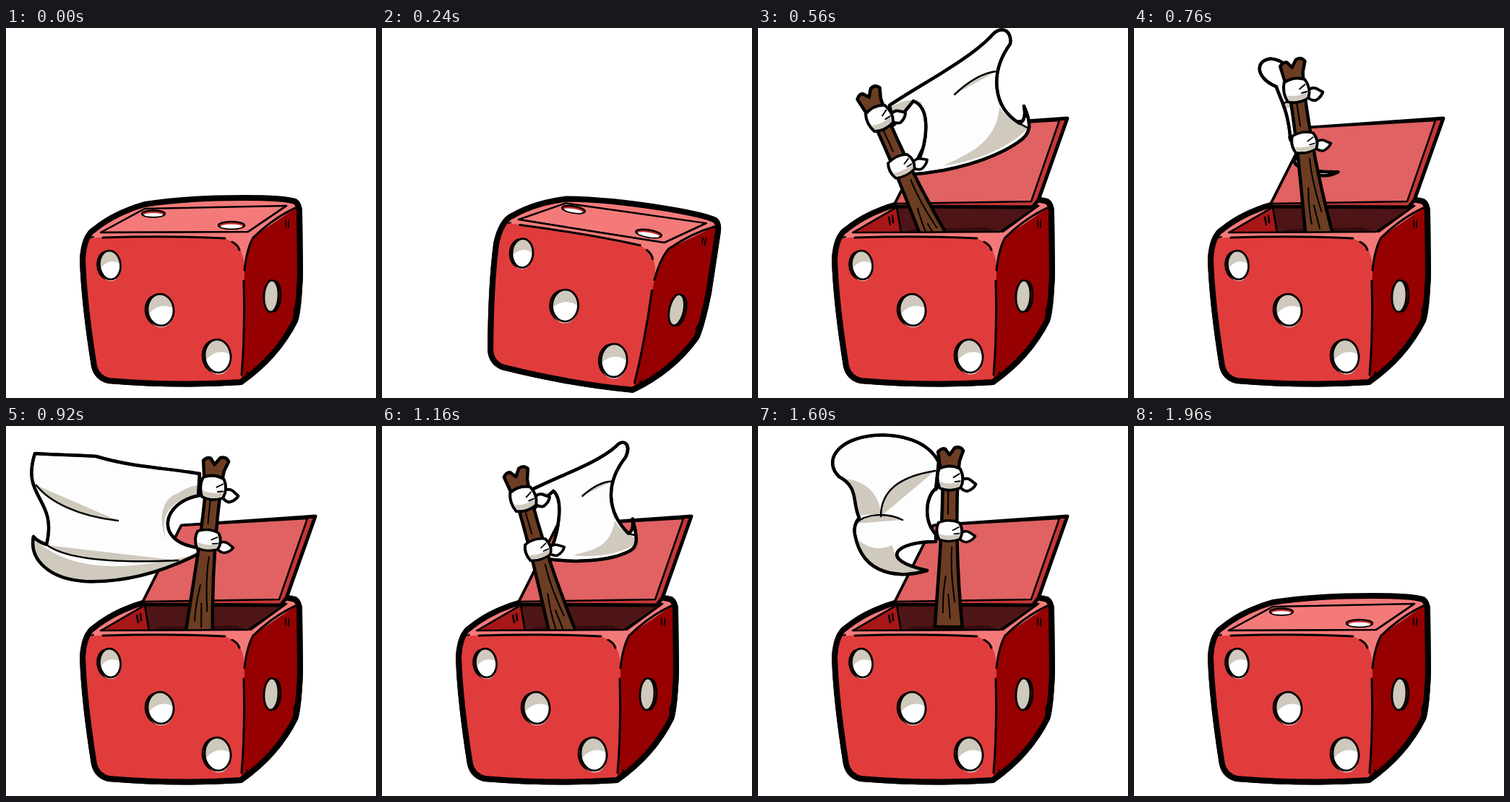
Recreate the animation shown at these times as an HTML page. Size 512 by 512 pixels, loop 2 s.

```html
<!DOCTYPE html>
<html lang="en">
<head>
<meta charset="utf-8">
<title>Dice box with flag</title>
<style>
html, body { margin: 0; width: 100%; height: 100%; overflow: hidden; background: #fff; }
svg { display: block; width: 100%; height: 100%; }
.ink { stroke: #000; stroke-linecap: round; stroke-linejoin: round; }
.line { fill: none; }
.cloth { fill: #fdfdfd; stroke-width: 4; }
.shade { fill: #cfc9be; }
</style>
</head>
<body>
<svg viewBox="0 0 512 512">
  <defs><clipPath id="flagClip"><path id="flagClipPath"/></clipPath></defs>
  <g id="die">
    <path id="body" class="ink" fill="#f47a7a" stroke-width="8"/>
    <g id="panel" class="ink" stroke-width="2.5">
      <path class="line" d="M131 283L192 250L388 246L335 282Z"/>
      <g id="topPips"></g>
    </g>
    <g id="inside" class="ink" stroke-width="2.5">
      <path fill="#4d1515" d="M130 284L192 248L388 246L336 284Z"/>
      <path fill="#a81717" d="M130 284L192 248L198 284Z"/>
      <path fill="#350b0e" stroke="none" d="M199 283L216 278L318 276L336 283Z"/>
      <path class="line" d="M181 262l2 10M186 260l1 9"/>
      <path id="lidEdge" fill="#c53636" stroke-width="5"/>
      <path id="lid"/>
    </g>
    <g id="banner">
      <path id="flag" class="ink cloth" stroke-width="4.5"/>
      <g clip-path="url(#flagClip)">
        <path id="shades" class="shade"/>
        <path id="folds" class="ink shade" stroke-width="2.5"/>
      </g>
      <path id="flagLine" class="ink line" stroke-width="4.5"/>
      <g id="pole">
        <path class="ink" fill="#6c3d22" stroke-width="4.5" d="M-14 -262L-17 -282Q-12 -288 -7 -286L-1 -278L6 -288Q14 -291 18 -284L13 -270L11 -250C9 -180 12 -110 20 -40L-18 -40C-14 -110 -9 -180 -10 -250Z"/>
        <path class="ink line" stroke-width="2" d="M-2 -228V-196M4 -150Q2 -120 9 -75M-4 -110Q-8 -85 -7 -60M0 -85L3 -52"/>
        <g id="knots"></g>
      </g>
    </g>
    <path fill="#f47a7a" d="M122 283L336 282L347 288L330 306L108 298Z"/>
    <path class="ink line" stroke-width="2.5" d="M131 283L335 282L388 246"/>
    <path fill="#e03c3c" d="M108 300Q112 290 125 290Q230 286 300 291Q328 296 330 330L327 490Q240 496 142 488Q126 484 122 468Q108 380 106 320Z"/>
    <path fill="#960000" d="M330 335Q334 297 345 287L402 248L407 340Q405 390 400 405Q375 455 326 490Z"/>
    <path class="ink line" stroke-width="3" d="M134 290Q230 287 303 291M313 296Q321 300 323 307M329 350Q331 420 326 480M330 335Q333 306 342 290Q370 263 400 249"/>
    <path class="ink line" stroke-width="2" d="M387 266V275M391 267V276M402 380L398 393M334 476L332 482M113 291L121 289"/>
    <g id="pips"></g>
    <path id="edge" class="ink line" stroke-width="8"/>
  </g>
</svg>
<script>
const $ = id => document.getElementById(id);
const set = (id, attrs) => Object.entries(attrs).forEach(([k, v]) => $(id).setAttribute(k, v));
const LOOP = 2000, STEP = 40, PIVOT = [262, 330];

const edge = "M122 279Q108 288 106 320Q108 380 122 468Q126 484 142 488Q240 496 325 490" +
  "Q375 455 400 405Q405 390 407 340L406 256Q406 244 400 240";
set("edge", { d: edge });
set("body", { d: edge + "Q385 235 330 235Q250 235 192 244Q150 256 122 279Z" });

function pip(x, y, rx, ry, side) {
  const white = side ? "" :
    `<path fill="#fff" d="M${-rx} ${ry * .2}Q0 ${-ry * .55} ${rx} 0A${rx} ${ry} 0 0 1 ${-rx} ${ry * .2}"/>`;
  const dx = side ? 4 : -4;
  return `<g transform="translate(${x} ${y}) rotate(${side ? 3 : -6})">
    <ellipse class="ink" cx="${dx}" rx="${rx - 1}" ry="${ry - 1}" fill="#a51616" stroke-width="2.5"/>
    <ellipse rx="${rx}" ry="${ry}" fill="#cfc9be"/>${white}
    <ellipse class="ink line" rx="${rx}" ry="${ry}" stroke-width="2.8"/></g>`;
}
$("pips").innerHTML = pip(144, 328, 14.5, 20) + pip(214, 390, 18, 22) +
  pip(293, 454, 18, 23) + pip(367, 371, 10, 22, true);
$("topPips").innerHTML = [[204, 257, 16, 4.5], [312, 273, 18, 5]].map(([x, y, rx, ry]) =>
  `<ellipse cx="${x}" cy="${y}" rx="${rx}" ry="${ry}" fill="#c52d2d"/>
   <ellipse cx="${x}" cy="${y + 1.5}" rx="${rx - 3}" ry="${ry - 2}" fill="#fff" stroke="none"/>`).join("");
$("knots").innerHTML = [[-246, 1], [-173, .86]].map(([y, s]) =>
  `<g class="ink" transform="translate(0 ${y}) scale(1 ${s})">
    <path class="cloth" d="M14 4Q22 -2 28 2L36 8Q33 15 24 18Q16 17 12 8Z"/>
    <path class="cloth" d="M-15 -13Q0 -20 14 -13Q21 0 15 13Q0 20 -14 14Q-20 0 -15 -13Z"/>
    <path class="shade" stroke="none" d="M-14 5Q-2 10 14 5L13 12Q0 17 -12 12Z"/>
    <path class="line" stroke-width="2" d="M13 -6L5 -1M14 4L7 5"/></g>`).join("");

// Cloth poses: outline, two shaded patches, two fold lines
const poses = {
  right: { angle: -24.6, rise: -20,
    flag: "182 107 230 75 290 45 322 12 335 -5 352 2 349 22 320 62 325 110 362 132 370 128 370 118 368 108 380 135 377 147 360 158 325 182 265 200 206 203 222 183 234 160 240 110 215 101 188 134",
    shades: ["333 60 322 110 340 125 374 138 350 165 300 185 258 190 310 165 345 150 333 60",
      "188 134 195 115 205 108 228 104 215 96 200 100 183 110 183 118 185 126 188 134"],
    folds: ["362 132 365 134 369 136 373 138", "330 60 310 62 290 75 272 92"] },
  curl: { angle: -26.3, rise: -20,
    flag: "188 110 200 95 225 75 250 48 270 25 305 22 336 12 310 55 345 40 352 108 355 105 360 98 362 91 378 130 370 140 360 148 320 170 265 195 210 204 222 183 232 160 236 115 214 105 190 133",
    shades: ["215 92 260 88 300 85 330 55 315 45 330 25 336 12 315 55 270 60 215 92",
      "188 134 195 118 205 106 232 130 225 115 215 105 200 106 195 108 190 112 188 118"],
    folds: ["352 108 340 130 300 165 222 184", "205 97 240 85 300 92 338 58"] },
  billow: { angle: .8, rise: 12,
    flag: "250 50 235 20 195 10 160 13 110 18 90 48 112 70 140 85 130 105 140 127 135 133 132 140 134 150 145 210 200 210 234 200 165 185 190 160 246 160 246 150 228 130 232 95 248 85 246 88",
    shades: ["134 150 135 190 150 210 232 200 185 195 190 170 185 165 165 175 140 165 134 150",
      "112 72 122 80 135 90 135 125 150 122 165 122 172 124 165 90 150 75 112 72"],
    folds: ["135 135 150 120 180 120 200 130", "170 125 170 90 195 70 245 62"] },
  left: { angle: 5.7, rise: 0,
    flag: "268 66 220 58 170 56 125 42 100 40 70 40 40 38 20 100 72 100 56 164 50 162 42 158 38 153 32 185 60 212 110 215 170 217 225 198 268 176 264 168 205 160 215 105 268 96 266 96",
    shades: ["38 155 40 190 60 213 110 215 160 217 215 203 262 178 170 200 90 205 38 155",
      "268 96 225 102 212 125 222 158 210 130 215 100 238 93 250 85 260 82 268 82"],
    folds: ["57 165 85 185 150 190 238 186", "42 82 60 105 100 125 155 131"] }
};

function rotate([x, y], degrees) {
  const a = degrees * Math.PI / 180, c = Math.cos(a), s = Math.sin(a);
  return [x * c - y * s, x * s + y * c];
}

// Stage coordinates to coordinates along the pole
function toLocal(text, { angle, rise }) {
  const n = text.split(" ").map(Number), points = [];
  for (let i = 0; i < n.length; i += 2) {
    const [x, y] = rotate([n[i] - PIVOT[0], n[i + 1] - PIVOT[1]], -angle);
    points.push([x, y + rise]);
  }
  return points;
}
for (const p of Object.values(poses)) p.parts = [p.flag, ...p.shades, ...p.folds].map(s => toLocal(s, p));

// time, pole angle, pole rise, cloth pose, cloth size
const swing = [
  [430, -4, -275, "right", .1], [480, -12, -150, "right", .45], [520, -20, -60, "right", .85],
  [560, -24.6, -20, "right", 1], [640, -26.3, -20, "curl", 1], [840, .8, 12, "billow", 1],
  [920, 5.7, 0, "left", 1], [1000, -1, 0, "left", 1], [1200, -18, -8, "right", .95],
  [1320, -25, -18, "right", 1], [1400, -26.3, -20, "curl", 1], [1600, .8, 12, "billow", 1],
  [1680, 5.7, 0, "left", 1], [1740, 4, -35, "left", .93], [1840, -2, -275, "left", .12]
];
const shake = [[0, 0], [90, -2.4], [240, 9.3], [370, -2], [440, 0]];
const lidMove = [[430, 0], [520, 1], [1790, 1], [1920, 0]];

const mix = (a, b, k) => a + (b - a) * k;
const mixPoint = (p, q, k) => [mix(p[0], q[0], k), mix(p[1], q[1], k)];

function span(keys, t) {
  if (t <= keys[0][0]) return [keys[0], keys[0], 0];
  const i = keys.findIndex(key => key[0] > t);
  if (i < 0) return [keys.at(-1), keys.at(-1), 0];
  const a = keys[i - 1], b = keys[i], u = (t - a[0]) / (b[0] - a[0]);
  return [a, b, u * u * (3 - 2 * u)];
}
function valueAt(keys, t) {
  const [a, b, k] = span(keys, t);
  return mix(a[1], b[1], k);
}

const at = p => p.map(v => v.toFixed(1)).join(" ");
const polygon = points => "M" + points.map(at).join("L") + "Z";
const curve = points => "M" + at(points[0]) + "C" + points.slice(1).map(at).join(" ");
const outline = p => curve(p.slice(0, 19)) + "L" + at(p[19]) + "C" +
  p.slice(20, 23).map(at).join(" ") + "L" + at(p[23]) + "Z";

function drawBanner(t) {
  const [a, b, k] = span(swing, t);
  const [angle, rise, size] = [1, 2, 4].map(i => mix(a[i], b[i], k));
  const visible = rise > -270;
  set("banner", { visibility: visible ? "visible" : "hidden" });
  if (!visible) return;
  const place = ([x, y]) => {
    const p = rotate([x * size, -210 + (y + 210) * size - rise], angle);
    return [p[0] + PIVOT[0], p[1] + PIVOT[1]];
  };
  const target = poses[b[3]].parts;
  const [flag, s1, s2, f1, f2] = poses[a[3]].parts.map((part, i) =>
    part.map((p, j) => place(mixPoint(p, target[i][j], k))));
  const d = outline(flag);
  for (const id of ["flag", "flagClipPath", "flagLine"]) set(id, { d });
  set("shades", { d: curve(s1) + "Z" + curve(s2) + "Z" });
  set("folds", { d: curve(f1) + curve(f2) });
  set("pole", { transform: `translate(${PIVOT}) rotate(${angle}) translate(0 ${-rise})` });
}

function drawLid(open) {
  const isOpen = open > .01;
  set("inside", { visibility: isOpen ? "visible" : "hidden" });
  set("panel", { visibility: isOpen ? "hidden" : "visible" });
  if (!isOpen) return;
  const bump = Math.sin(Math.PI * open);
  const hingeL = [190, 243], hingeR = [378, 240];
  const far = (hinge, closed, opened) => {
    const v = mixPoint(closed, opened, open);
    return [hinge[0] + v[0] - 20 * bump, hinge[1] + v[1] - 50 * bump];
  };
  const farL = far(hingeL, [-60, 40], [53, -105]), farR = far(hingeR, [-43, 42], [39, -112]);
  const shift = (p, x, y) => [p[0] + x * open, p[1] + y * open];
  set("lidEdge", { d: polygon([shift(hingeL, -2, 4), shift(hingeR, 2, 8), shift(hingeR, 10, -2),
    shift(farR, 11, -3), farL]) });
  set("lid", { d: polygon([hingeL, hingeR, farR, farL]), fill: open > .5 ? "#e06262" : "#f47a7a" });
}

function draw(t) {
  set("die", { transform: `rotate(${valueAt(shake, t)} 270 630)` });
  drawLid(valueAt(lidMove, t));
  drawBanner(t);
}

const start = performance.now();
function tick() {
  const t = (performance.now() - start) % LOOP;
  draw(Math.floor(t / STEP) * STEP);
  requestAnimationFrame(tick);
}
tick();
</script>
</body>
</html>
```
